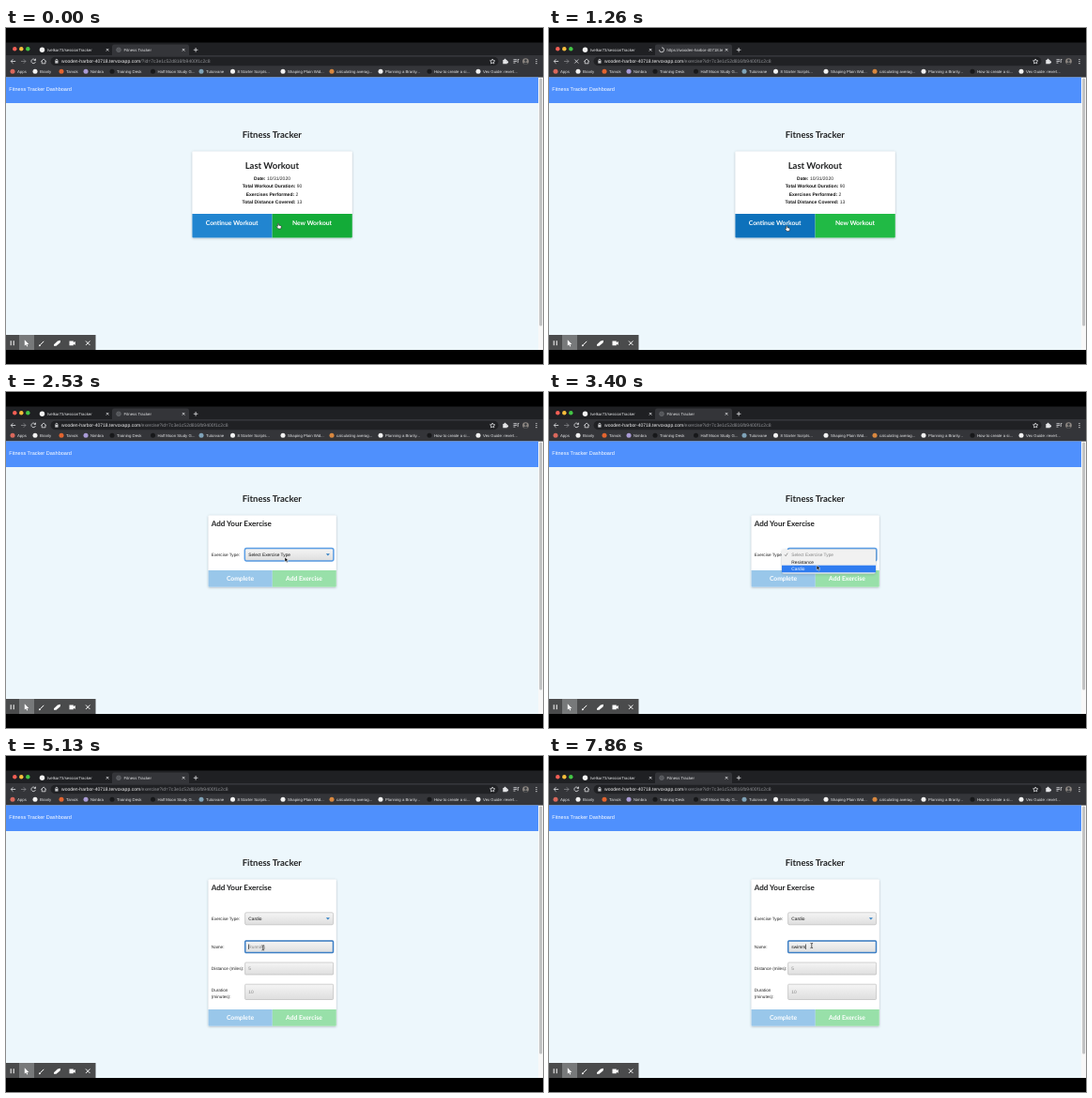
Animation of 572x358 px, one loop 8 s. Source, as an HTML page:

```html
<!DOCTYPE html>
<html lang="en">
<head>
<meta charset="utf-8">
<title>Fitness Tracker</title>
<style>
  html, body { margin: 0; width: 100%; height: 100%; overflow: hidden; background: #000; }
  svg { display: block; width: 572px; height: 358px; text-rendering: geometricPrecision; }
  text { font-family: "Liberation Sans", Arial, sans-serif; white-space: pre; }
  .lato { font-family: Lato, sans-serif; font-weight: 700; }
  .mid { text-anchor: middle; }
  .h2 { font-size: 9.5px; fill: #202122; }
  .h3 { font-size: 8.05px; fill: #202122; }
  .btn { font-size: 6.75px; fill: #fff; }
  .stat { font-size: 5px; fill: #222; }
  .stat tspan { font-weight: 700; fill: #111; }
  .label { font-size: 4.65px; fill: #222; }
  .field { font-size: 4.8px; fill: #111; }
  .hint { fill: #858585; }
  .ui { font-size: 4.3px; fill: #e4e5e7; }
  .url { font-size: 5.05px; fill: #f1f1f2; }
  .url tspan { fill: #8f9195; }
  .box { fill: url(#metal); stroke: #b3b3b3; stroke-width: .6; }
  .ring { fill: none; stroke-width: 1.5; }
  .line { fill: none; stroke: #e4e5e7; stroke-width: .8; }
  .tool { fill: none; stroke: #fff; stroke-width: 1; }
</style>
</head>
<body>
<svg viewBox="0 0 572 358">
  <defs>
    <linearGradient id="metal" x2="0" y2="1">
      <stop stop-color="#f5f5f5"/><stop offset="1" stop-color="#dedede"/>
    </linearGradient>
    <filter id="shadow" x="-10%" y="-10%" width="120%" height="125%">
      <feDropShadow dx="0" dy=".6" stdDeviation=".9" flood-color="#53606b" flood-opacity=".45"/>
    </filter>
    <clipPath id="tabClip"><path d="M125 17h60v12h-60z"/></clipPath>
  </defs>

  <!-- browser chrome -->
  <path fill="#1f2023" d="M0 15.500h572v14H0z"/>
  <path fill="#343539" d="M0 29h572v23.500H0zM113 29v-9q0-2.500 2.500-2.500h77q2.500 0 2.500 2.500v9z"/>
  <circle cx="9.300" cy="22.300" r="2.200" fill="#f45f55"/>
  <circle cx="16.300" cy="22.300" r="2.200" fill="#f6bd3b"/>
  <circle cx="23.300" cy="22.300" r="2.200" fill="#43c645"/>
  <circle cx="38.500" cy="23.300" r="2.700" fill="#f2f2f2"/>
  <text class="ui" x="44" y="24.900">tvelkar73/sessionTracker</text>
  <path class="line" d="M106.800 22l2.600 2.600m0-2.600l-2.600 2.600M187.800 22l2.600 2.600m0-2.600l-2.600 2.600M199.800 23.300h4.600m-2.300-2.300v4.600"/>
  <circle id="globe" cx="120" cy="23.300" r="2.400" fill="#55575b" stroke="#737579" stroke-width=".5"/>
  <path id="spinner" class="line" d="M120 20.800a2.500 2.500 0 1 1-2.500 2.500"/>
  <g clip-path="url(#tabClip)"><text id="tabTitle" class="ui" x="125.500" y="24.900"></text></g>

  <rect x="47.500" y="30.800" width="477" height="9.400" rx="4.700" fill="#202124"/>
  <path class="line" d="M10.200 35.500H5.300m2.200-2.300l-2.300 2.300 2.300 2.300"/>
  <path class="line" stroke-opacity=".45" d="M16 35.500h4.900m-2.200-2.300l2.300 2.300-2.300 2.300"/>
  <path id="reload" class="line" d="M31.200 34.200a2.300 2.300 0 1 0 .2 2M31.500 32.700v1.800h-1.800"/>
  <path id="stop" class="line" d="M27.300 33.500l4 4m0-4l-4 4"/>
  <path class="line" d="M37.300 35.600l2.800-2.500 2.800 2.500M38.200 35v2.800h3.800V35"/>
  <path fill="#c9cacd" d="M52.300 35h3.200v2.600h-3.200z"/>
  <path class="line" stroke-width=".6" d="M52.900 35v-.7a1 1 0 0 1 2 0v.7"/>
  <text class="url" x="59" y="37.300">wooden-harbor-40718.tervoxapp.com<tspan id="path"></tspan></text>
  <path class="line" stroke-width=".6" d="M518.200 33l.8 1.700 1.800.2-1.300 1.200.3 1.800-1.600-.9-1.600.9.300-1.800-1.300-1.200 1.800-.2z"/>
  <path fill="#e4e5e7" d="M529.300 34h1.300a1 1 0 1 1 1.900 0h1.200v1.400a1 1 0 1 1 0 1.800v1.100h-4.400z"/>
  <path class="line" d="M540.500 33.700h3.500m-3.500 1.700h3.500m-3.500 1.700h2m2.700 0v-3.600h1.200"/>
  <circle cx="553.500" cy="35.500" r="3.300" fill="#8d8782"/>
  <path fill="#36393d" d="M551.200 37.800q2.300-2.600 4.600 0q-2.300 2-4.600 0z"/>
  <circle cx="553.500" cy="34.600" r="1.300" fill="#36393d"/>
  <path fill="#e4e5e7" d="M564.400 32.900h1.100V34h-1.100zM564.400 35h1.100v1.100h-1.100zM564.400 37.100h1.100v1.100h-1.100z"/>
  <g id="marks"></g>

  <!-- page -->
  <path fill="#edf7fc" d="M0 52.500h567V343H0z"/>
  <path fill="#4f90fd" d="M0 52.500h567V80H0z"/>
  <text x="3.300" y="67.100" font-size="5.560" fill="#fff">Fitness Tracker Dashboard</text>
  <path fill="#f8f8f8" d="M567 52.500h5V343h-5z"/>
  <rect x="568.100" y="53.500" width="3" height="264" rx="1.500" fill="#c0c1c2"/>
  <text class="lato mid h2" x="283.300" y="117.200">Fitness Tracker</text>

  <g id="summary">
    <rect x="198.400" y="131.500" width="170.400" height="92" rx="1" fill="#fff" filter="url(#shadow)"/>
    <text class="lato mid h2" x="283.300" y="149.600">Last Workout</text>
    <text class="stat mid" x="283.500" y="161.900"><tspan>Date:</tspan> 10/31/2020</text>
    <text class="stat mid" x="283.500" y="170.200"><tspan>Total Workout Duration:</tspan> 90</text>
    <text class="stat mid" x="283.500" y="178.500"><tspan>Exercises Performed:</tspan> 2</text>
    <text class="stat mid" x="283.500" y="186.700"><tspan>Total Distance Covered:</tspan> 13</text>
    <path id="goOn" d="M198.400 198H283.600v25.500H199.400q-1 0-1-1z"/>
    <path id="fresh" d="M283.600 198h85.200v24.500q0 1-1 1h-84.200z"/>
    <text class="lato mid btn" x="240.700" y="209.800">Continue Workout</text>
    <text class="lato mid btn" x="326" y="209.800">New Workout</text>
  </g>

  <g id="form">
    <rect id="card" x="215.500" y="131.500" width="136.300" rx="1" fill="#fff" filter="url(#shadow)"/>
    <text class="lato h3" x="218.800" y="142.900">Add Your Exercise</text>
    <text class="label" x="218.800" y="175.200">Exercise Type:</text>
    <rect class="box" x="254.600" y="166.800" width="94" height="13" rx="1.500"/>
    <text id="choice" class="field" x="258.300" y="175"></text>
    <path fill="#2f7fc4" d="M340.900 172.200h4l-2 2.300z"/>
    <rect id="pickRing" class="ring" stroke="#5c9fe6" x="254.300" y="166.500" width="94.600" height="13.600" rx="2"/>
    <g id="details">
      <text class="label" x="218.800" y="205.100">Name:</text>
      <text class="label" x="218.800" y="228.300">Distance (miles):</text>
      <text class="label" x="218.800" y="251.400">Duration</text>
      <text class="label" x="218.800" y="257.800">(minutes):</text>
      <rect class="box" x="254.600" y="197" width="94" height="12.600" rx="1"/>
      <rect class="box" x="254.600" y="220" width="94" height="13" rx="1"/>
      <rect class="box" x="254.600" y="243.200" width="94" height="16.300" rx="1"/>
      <rect id="nameRing" class="ring" stroke="#3c7fc6" x="254.700" y="197" width="93.800" height="12.600" rx="1"/>
      <text id="name" class="field" x="258.300" y="205"></text>
      <text class="field hint" x="258.300" y="228.200">5</text>
      <text class="field hint" x="258.300" y="253.100">10</text>
      <path id="caret" fill="#111" d="M0 200.600h.6v5.500H0z"/>
    </g>
    <g id="footer">
      <path fill="#99c7ea" d="M215.500 0H283.800v17.800H216.500q-1 0-1-1z"/>
      <path fill="#98e0a9" d="M283.800 0h68v16.800q0 1-1 1h-67z"/>
      <text class="lato mid btn" x="249.500" y="11.200">Complete</text>
      <text class="lato mid btn" x="317.400" y="11.200">Add Exercise</text>
    </g>
    <g id="menu">
      <rect x="248" y="168" width="100" height="25.500" rx="2" fill="#f1f1f1" filter="url(#shadow)"/>
      <rect id="glow" x="248" width="100" height="7.600" fill="#2f7cf0"/>
      <path fill="none" stroke="#777" stroke-width=".7" d="M251 173.300l1.200 1.500 2-3.200"/>
      <text class="field hint" x="258.300" y="175">Select Exercise Type</text>
      <text id="opt1" class="field" x="258.300" y="182.600">Resistance</text>
      <text id="opt2" class="field" x="258.300" y="190.200">Cardio</text>
    </g>
  </g>

  <!-- recorder tools -->
  <path fill="#4a4b4c" d="M0 327h95.500v16H0z"/>
  <path fill="#77797a" d="M14 327h16v16H14z"/>
  <path class="tool" stroke-width="1.400" d="M5.200 333.200v5m3-5v5"/>
  <path fill="#fff" d="M19.800 332.300v6.300l1.500-1.300 1 2.100 1-.5-1-2h2z"/>
  <path class="tool" stroke-width="2" d="M36.300 337.800l4-4"/>
  <path fill="#fff" d="M34.900 339.300l.6-2.300 1.700 1.700z"/>
  <path fill="#fff" d="M51 337.200l4-3.800 3-.7-.3 2.500-4.200 3.600h-2.500z"/>
  <path fill="#fff" d="M67.500 333.500h4.300v1.500l2-1v3.800l-2-1v1.500h-4.300z"/>
  <path class="tool" d="M85 333.500l4.400 4.400m0-4.400l-4.400 4.400"/>

  <g id="pointer">
    <path id="hand" fill="#fff" stroke="#222" stroke-width=".6" d="M-.6 0q.6-.8 1.100 0l.2 1.700 2 .5q.8.300.6 1.200l-.6 2H0L-1.900 3q.1-.8 1.300-.2z"/>
    <path id="arrow" stroke="#fff" stroke-width=".5" d="M0 0v5l1.200-1.100.9 1.900 1-.5-.9-1.800h1.600z"/>
    <path id="beam" fill="none" stroke="#222" stroke-width=".7" d="M-1.300-2.600q1.300 0 1.300.7q0-.7 1.300-.7M0-2v4M-1.300 2.600q1.300 0 1.300-.7q0 .7 1.300.7"/>
  </g>
</svg>
<script>
const LOOP = 8000;
const LOAD = 930, PAGE = 1730, FOCUS = 2330, OPEN = 2600, PICK = 4060, ENTER = 4930;
const KEYS = [7130, 7330, 7460, 7600, 7860];
const WORD = "swimm";
const ID = "id=7c3e1c52d816fb9400f1c2c8";

// time, x, y
const PATH = [
  [0, 290, 208.5], [60, 290, 208.5], [860, 253.3, 211], [1500, 253.3, 211],
  [PAGE, 258, 203], [FOCUS, 297, 176], [2860, 297, 176], [3600, 282.6, 186.6],
  [4130, 282.6, 186.6], [4860, 273.8, 204.3], [5260, 273.8, 204.3], [5460, 279.8, 202]
];

const MARKS = [
  [7, "Apps", "#d9685c"], [31, "Branly", "#f2f2f2"], [59, "Tarvok", "#e2642f"],
  [85, "Nimbra", "#a99bd6"], [113, "Training Desk", "#17181a"],
  [156.500, "Half Moon Study G...", "#17181a"], [208, "Tutorvane", "#7fa3b8"],
  [241.500, "8 Starter Scripts...", "#f2f2f2"], [295, "Shaping Plain Wid...", "#f2f2f2"],
  [347, "calculating averag...", "#d8873f"], [399, "Planning a Branly...", "#f2f2f2"],
  [451, "How to create a si...", "#17181a"], [503, "Vex Guide: revert...", "#f2f2f2"]
];

const $ = id => document.getElementById(id);
const show = (id, on) => $(id).style.display = on ? "" : "none";
const paint = (id, color) => $(id).setAttribute("fill", color);
const write = (id, text) => { if ($(id).textContent !== text) $(id).textContent = text; };

$("marks").innerHTML = MARKS.map(([x, label, color]) =>
  `<circle cx="${x}" cy="46.200" r="2.500" fill="${color}"/>
   <text class="ui" x="${x + 5}" y="47.800">${label}</text>`).join("");

function locate(t) {
  const i = PATH.findIndex(p => p[0] > t);
  if (i < 0) return PATH[PATH.length - 1].slice(1);
  const [t0, x0, y0] = PATH[i - 1], [t1, x1, y1] = PATH[i];
  const u = (t - t0) / (t1 - t0), e = u * u * (3 - 2 * u);
  return [x0 + (x1 - x0) * e, y0 + (y1 - y0) * e];
}

function drawChrome(t) {
  const loading = t >= LOAD && t < PAGE;
  show("spinner", loading);
  show("stop", loading);
  show("globe", !loading);
  show("reload", !loading);
  $("spinner").setAttribute("transform", `rotate(${(t - 1260) * 0.36} 120 23.3)`);
  write("tabTitle", loading ? "https://wooden-harbor-40718.tervoxapp" : "Fitness Tracker");
  write("path", (t < LOAD ? "/?" : "/exercise?") + ID);
}

function drawForm(t, y) {
  const full = t >= PICK, active = t >= ENTER;
  const foot = full ? 270 : 190;
  $("card").setAttribute("height", foot + 17.8 - 131.5);
  $("footer").setAttribute("transform", `translate(0 ${foot})`);
  write("choice", full ? "Cardio" : "Select Exercise Type");
  show("pickRing", t >= FOCUS && !active);
  show("details", full);
  show("nameRing", active);

  const typed = WORD.slice(0, KEYS.filter(k => t >= k).length);
  write("name", typed || "Running");
  $("name").classList.toggle("hint", !typed);
  const blinkOff = t >= 5460 && t < 5860 || t >= 6400 && t < 6860;
  show("caret", active && !blinkOff);
  const end = typed ? $("name").getComputedTextLength() : 0;
  $("caret").setAttribute("transform", `translate(${258.3 + end} 0)`);

  const row = y < 177 ? 0 : y < 184.4 ? 1 : 2;
  show("menu", t >= OPEN && !full);
  show("glow", row > 0);
  $("glow").setAttribute("y", 169.5 + row * 7.6);
  for (const n of [1, 2]) paint("opt" + n, ""), $("opt" + n).style.fill = n === row ? "#fff" : "#111";
}

function draw(now) {
  const t = now % LOOP;
  const [x, y] = locate(t);
  const onForm = t >= PAGE, left = x < 283.6;
  drawChrome(t);
  show("summary", !onForm);
  show("form", onForm);
  paint("goOn", left ? "#0d71bb" : "#2185d0");
  paint("fresh", left ? "#21ba45" : "#13ab38");
  drawForm(t, y);

  const overName = t >= PICK && y > 197;
  show("hand", !onForm);
  show("arrow", onForm && !overName);
  show("beam", overName);
  $("pointer").setAttribute("transform", `translate(${x} ${y})`);
}

function tick() {
  draw(performance.now());
  requestAnimationFrame(tick);
}
tick();
</script>
</body>
</html>
```
